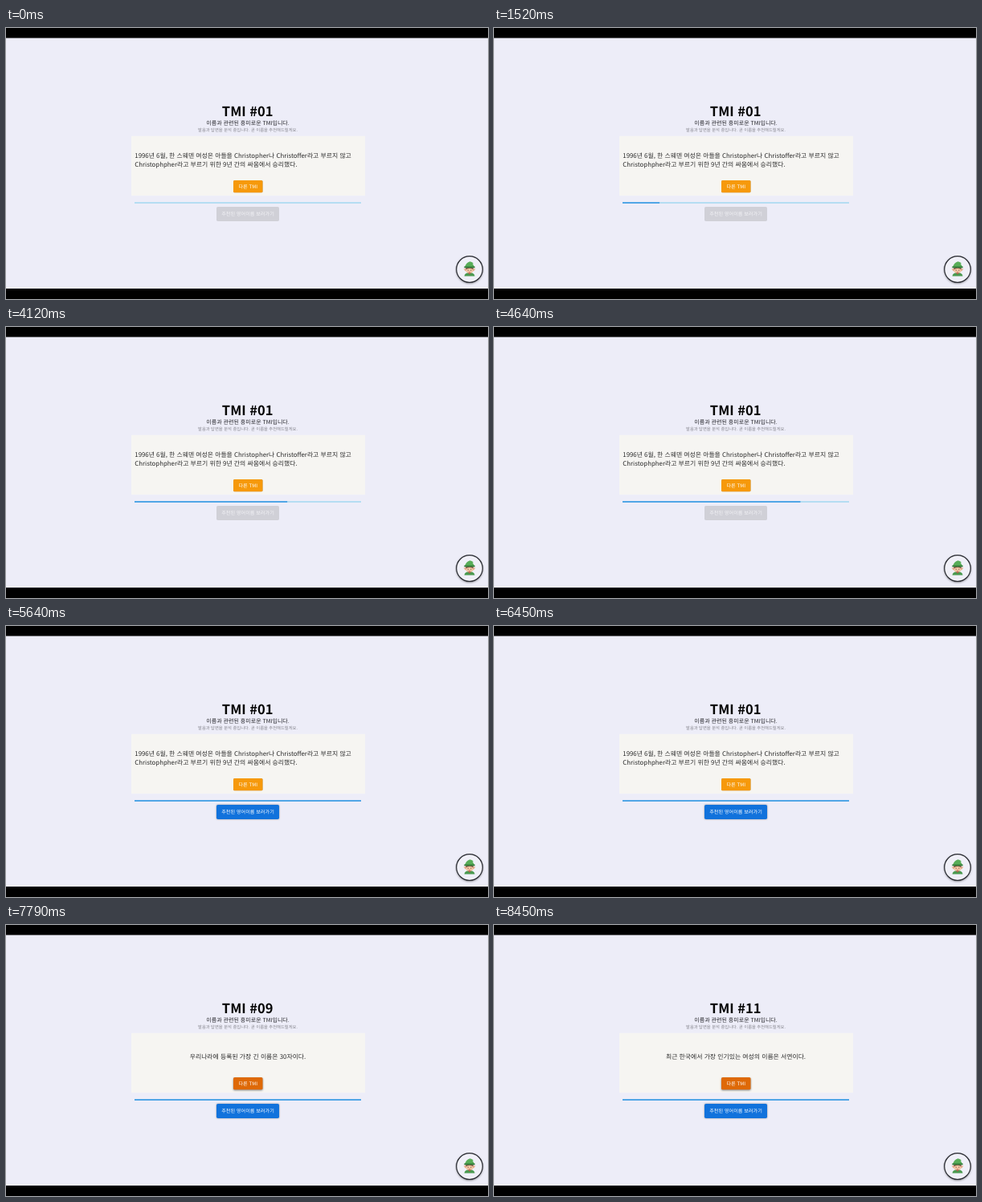
An HTML page that plays this animation: 600x338 px, repeating every 8.51 s.

```html
<!DOCTYPE html>
<html lang="ko">
<head>
<meta charset="utf-8">
<title>TMI</title>
<style>
  html, body { margin: 0; width: 100%; height: 100%; overflow: hidden; background: #000; }
  svg { display: block; width: 100vw; height: 100vh; }
  text {
    font-family: "Noto Sans CJK KR", "Noto Sans CJK", "Noto Sans", sans-serif;
    text-rendering: geometricPrecision;
  }
  .mid { text-anchor: middle; }
  .title { font-size: 16.5px; font-weight: 700; fill: #050505; }
  .sub { font-size: 7px; fill: #25252a; }
  .note { font-size: 5.3px; fill: #85858d; }
  .fact { font-size: 7.85px; fill: #2b2b2b; }
  .label { font-size: 6.15px; font-weight: 500; fill: #fff; }

  .page, .more, .next, .nextLabel, .ripple { animation: 8.51s infinite; }
  .page { animation-timing-function: step-end; }
  .p1 { animation-name: first; }
  .p2 { animation-name: second; }
  .p3 { animation-name: third; }
  @keyframes first { 0% { visibility: visible } 79.6%, 100% { visibility: hidden } }
  @keyframes second { 0% { visibility: hidden } 79.6% { visibility: visible } 97.3%, 100% { visibility: hidden } }
  @keyframes third { 0% { visibility: hidden } 97.3%, 100% { visibility: visible } }

  .more { fill: #f6990b; animation-name: hover; filter: drop-shadow(0 .7px .7px #0005); }
  @keyframes hover {
    0%, 76.4% { fill: #f6990b; filter: drop-shadow(0 .7px .7px #0005); }
    79.3%, 100% { fill: #de6907; filter: drop-shadow(0 1px 1.3px #0007); }
  }
  .next { animation-name: enable; }
  @keyframes enable {
    0%, 60.9% { fill: #d0d0d7; filter: drop-shadow(0 0 0 #0000); }
    63.8%, 100% { fill: #1172dc; filter: drop-shadow(0 .7px .8px #0006); }
  }
  .nextLabel { animation-name: enableLabel; }
  @keyframes enableLabel { 0%, 60.9% { fill: #f3f3f7 } 63.8%, 100% { fill: #fff } }

  .ripple { fill: #fff; opacity: 0; transform-origin: 301px 198px; animation-name: ripple; }
  @keyframes ripple {
    0%, 78.8% { opacity: 0; transform: scale(0) }
    79.6% { opacity: .15; transform: scale(.5) }
    82.2% { opacity: 0; transform: scale(1) }
    82.3%, 96.5% { opacity: 0; transform: scale(0) }
    97.3% { opacity: .15; transform: scale(.5) }
    99.3%, 100% { opacity: 0; transform: scale(1) }
  }
  #bar { transform: scaleX(0); transform-origin: 160px 0; }
  .badge { fill: #f0f0f8; stroke: #24262c; stroke-width: 1.2; filter: drop-shadow(0 1px 1.2px #0005); }
</style>
</head>
<body>
<svg viewBox="0 0 600 338" preserveAspectRatio="none">
  <clipPath id="moreClip"><rect x="283" y="190" width="36.5" height="15.3" rx="1.6"/></clipPath>
  <rect width="600" height="338"/>
  <rect y="12.5" width="600" height="312.5" fill="#ededf8"/>
  <rect x="156" y="134.8" width="291" height="74.4" fill="#f6f5f2"/>

  <text class="sub mid" x="301" y="121.2">이름과 관련된 흥미로운 TMI입니다.</text>
  <text class="note mid" x="301" y="129.1">발음과 답변을 분석 중입니다. 곧 이름을 추천해드릴게요.</text>

  <g class="page p1">
    <text class="title mid" x="300.7" y="110">TMI #01</text>
    <text class="fact" x="160.3" y="162.1">1996년 6월, 한 스웨덴 여성은 아들을 Christopher나 Christoffer라고 부르지 않고</text>
    <text class="fact" x="160.3" y="172.8">Christophpher라고 부르기 위한 9년 간의 싸움에서 승리했다.</text>
  </g>
  <g class="page p2">
    <text class="title mid" x="300.7" y="110">TMI #09</text>
    <text class="fact mid" x="301" y="166.9">우리나라에 등록된 가장 긴 이름은 30자이다.</text>
  </g>
  <g class="page p3">
    <text class="title mid" x="300.7" y="110">TMI #11</text>
    <text class="fact mid" x="301" y="166.9">최근 한국에서 가장 인기있는 여성의 이름은 서연이다.</text>
  </g>

  <rect class="more" x="283" y="190" width="36.5" height="15.3" rx="1.6"/>
  <g clip-path="url(#moreClip)"><circle class="ripple" cx="301" cy="198" r="20"/></g>
  <text class="label mid" x="301.2" y="199.8">다른 TMI</text>

  <rect x="160" y="217" width="282" height="2" fill="#b5ddf2"/>
  <rect id="bar" x="160" y="217" width="282" height="2" fill="#50a6e6"/>

  <rect class="next" x="262" y="223" width="78" height="18" rx="1.8"/>
  <text class="label nextLabel mid" x="301" y="234.4">추천된 영어이름 보러가기</text>

  <circle class="badge" cx="577" cy="301" r="16.3"/>
  <g>
    <path d="M570.5 309.5q.5-4.5 6.5-4.500t6.500 4.500z" fill="#4b9a50"/>
    <path d="M572.500 300.500l-2.800-.6 1.600 3.200 2 .3zM581.500 300.500l2.800-.6-1.600 3.200-2 .3z" fill="#e9ad8c"/>
    <rect x="572.600" y="297.800" width="8.800" height="7.800" rx="3.600" fill="#f4c5a5"/>
    <path d="M572.400 301.500v-3h9.200v3q-1.500-2-4.600-1.800t-4.600 1.800z" fill="#774b3a"/>
    <path d="M571 298.600q1.500-5.800 6.500-7.300 2.500.2 4.500 2.200l-1.300.4q2 2 2.300 4.700z" fill="#58ad58"/>
    <rect x="570.200" y="297.300" width="13.600" height="2" rx="1" fill="#39823f"/>
    <path d="M575.200 301.600v1M578.800 301.600v1" stroke="#3c2b28" stroke-width=".8"/>
    <path d="M576 304.300h2" stroke="#c9605a" stroke-width=".6"/>
    <path d="M575 305.600l2 1.600 2-1.600z" fill="#c94f48"/>
  </g>
</svg>
<script>
  // Each tick adds a tenth of the bar over 400 ms, then waits for the next one.
  const LOOP = 8510, GROW = 400;
  const ticks = [640, 1268, 1740, 2209, 2678, 3250, 3824, 4300, 4750, 5180];
  const at = (ms, value) => ({ offset: ms / LOOP, transform: `scaleX(${value})` });
  const steps = ticks.flatMap((ms, i) => [at(ms, i / 10), at(ms + GROW, (i + 1) / 10)]);
  document.getElementById('bar').animate(
    [at(0, 0), ...steps, at(LOOP, 1)],
    { duration: LOOP, iterations: Infinity }
  );
</script>
</body>
</html>
```
